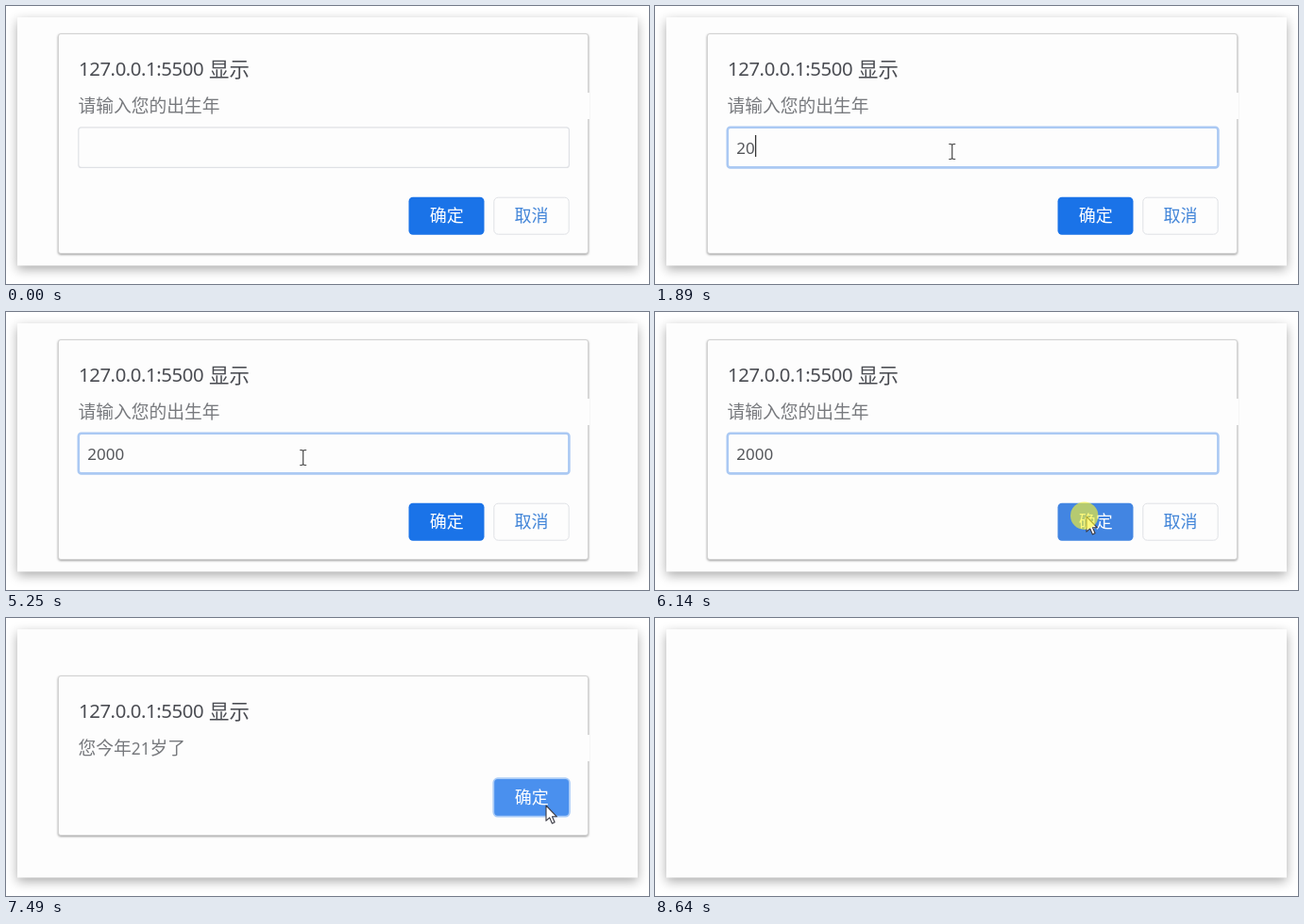
An HTML page that plays this animation: 681 px wide and 295 px high, repeating every 9.05 s.

```html
<!DOCTYPE html>
<html lang="zh">
<head>
<meta charset="utf-8">
<title>Prompt and alert</title>
<style>
  html, body { margin: 0; width: 100%; height: 100%; overflow: hidden; background: #fff; }
  svg { display: block; width: 681px; height: 295px; }
  text { font-family: "Noto Sans CJK SC", "Noto Sans CJK", sans-serif; white-space: pre; }
  .num { font-family: "Noto Sans", "Open Sans", sans-serif; }
  .card { fill: #fdfdfd; filter: drop-shadow(0 4px 6px rgba(0, 0, 0, .33)); }
  .panel { fill: #fdfdfd; stroke: #d2d2d2; filter: drop-shadow(0 1.5px 1.2px rgba(0, 0, 0, .38)); }
  .title { fill: #4a4c52; font-size: 21.4px; }
  .title .num, .title.num { font-size: 20.3px; letter-spacing: -.4px; }
  .body { fill: #77797d; font-size: 18.75px; }
  .body .num { font-size: 17.3px; }
  .value { fill: #55575b; font-size: 17px; }
  .label { font-size: 18px; text-anchor: middle; }
</style>
</head>
<body>
<svg viewBox="0 0 681 295">
  <defs>
    <clipPath id="inside"><rect x="12" y="12" width="657" height="264"/></clipPath>
    <g id="host">
      <text class="title num" x="77" y="74">127.0.0.1:5500</text>
      <text class="title" x="215" y="74.5">显示</text>
    </g>
  </defs>

  <rect class="card" x="12" y="12" width="657" height="263.5"/>

  <g id="prompt">
    <rect class="panel" x="55.5" y="29.5" width="561" height="233" rx="2.5"/>
    <rect x="616" y="92" width="2" height="28" fill="#fdfdfd"/>
    <use href="#host"/>
    <text class="body" x="76.5" y="112.6">请输入您的出生年</text>
    <rect id="field" x="76.8" y="128.8" width="519.6" height="42.6" rx="3" fill="#fdfdfd"/>
    <text id="value" class="value num" x="86.3" y="156.7"></text>
    <rect id="caret" y="137" width="1.3" height="23" fill="#333"/>
    <rect id="ok" x="426.5" y="202.7" width="80" height="40" rx="4.5"/>
    <text class="label" x="466.7" y="228.9" fill="#fff">确定</text>
    <rect x="516.8" y="203.2" width="79.4" height="39" rx="4.5" fill="#fdfdfd" stroke="#dfe1e5"/>
    <text class="label" x="556.5" y="228.9" fill="#4285d8">取消</text>
  </g>

  <g id="alert">
    <rect class="panel" x="55.5" y="61.5" width="561" height="169" rx="2.5"/>
    <rect x="616" y="124" width="2" height="28" fill="#fdfdfd"/>
    <use href="#host" y="32"/>
    <text class="body" x="76.5" y="144.6">您今年<tspan class="num">21</tspan>岁了</text>
    <rect id="done" x="516.3" y="170.2" width="80.6" height="40.4" rx="4.5" stroke="#a9cbf7" stroke-width="1.8"/>
    <text class="label" x="556.7" y="196.9" fill="#fff">确定</text>
  </g>

  <g clip-path="url(#inside)">
    <g id="pointer">
      <path id="arrow" d="M0 0V16.2L3.7 12.8L6.4 19L9.1 17.8L6.5 11.8H11.4Z"
            fill="#fff" stroke="#3a3a44" stroke-width="1.1" stroke-linejoin="round"/>
      <path id="beam" d="M-3.5 -7.5H-1.2L0 -6.6L1.2 -7.5H3.5M0 -6.6V7.6M-3.5 8.5H-1.2L0 7.6L1.2 8.5H3.5"
            fill="none" stroke="#4a4a4a" stroke-width="1.2"/>
      <circle id="halo" cx="-2.3" cy="-.8" r="14.7" fill="#fcf62c" fill-opacity=".62"/>
    </g>
  </g>
</svg>
<script>
const LOOP = 9050, STEP = 68, BLINK = 525;
const $ = id => document.getElementById(id);
const show = (id, on) => $(id).setAttribute('display', on ? 'inline' : 'none');
const set = (id, attrs) => { for (const k in attrs) $(id).setAttribute(k, attrs[k]); };
const within = (t, a, b) => t >= a && t < b;

// time, pointer x, pointer y
const path = [
  [70, 398, 266], [340, 345, 200], [610, 314.7, 154], [5250, 314.7, 154],
  [5610, 352, 168], [6070, 457, 217], [6270, 457, 217], [6690, 593, 183],
  [7100, 570, 196], [7420, 570, 196], [7490, 572, 199], [7690, 572, 199],
  [8230, 573, 208], [8430, 573, 208], [8520, 621, 257], [8590, 617, 253], [8640, 617, 253]
];

// time, field content
const edits = [
  [740, ''], [1750, '2'], [1890, '20'], [2610, '202'], [2740, '2020'],
  [3540, '202'], [3680, '20'], [4340, '200'], [4470, '2000']
];

const clicks = [[670, 870], [6140, 6270], [8300, 8430]];

function pointerAt(t) {
  const i = path.findIndex(p => p[0] > t);
  const [t0, x0, y0] = path[i - 1], [t1, x1, y1] = path[i];
  const n = Math.max(1, Math.round((t1 - t0) / STEP));
  const k = Math.floor((t - t0) / (t1 - t0) * n) / n;
  return [x0 + (x1 - x0) * k, y0 + (y1 - y0) * k];
}

function draw(t) {
  const asking = t < 6270, telling = within(t, 6340, 8430);
  const visible = within(t, 70, 8640);
  const [x, y] = visible ? pointerAt(t) : [0, 0];
  const over = (l, top, r, b) => visible && x >= l && x <= r && y >= top && y <= b;

  show('prompt', asking);
  show('alert', telling);

  const focused = t >= 740;
  set('field', { stroke: focused ? '#abc9f3' : '#dfe1e5', 'stroke-width': focused ? 2.6 : 1.2 });
  const edit = edits.filter(e => e[0] <= t).pop();
  const text = edit ? edit[1] : '';
  $('value').textContent = text;
  $('caret').setAttribute('x', 86.5 + 9.72 * text.length);
  show('caret', edit && (t - edit[0]) % (2 * BLINK) < BLINK);

  set('ok', { fill: over(427, 203, 507, 243) ? '#4285e2' : '#1a73e8' });
  const hot = over(516, 170, 597, 211);
  set('done', { fill: !hot ? '#1a73e8' : t < 7690 ? '#4a90ee' : '#428aeb' });

  show('pointer', visible);
  const typing = asking && over(77, 129, 597, 172);
  show('beam', typing);
  show('arrow', !typing);
  show('halo', clicks.some(([a, b]) => within(t, a, b)));
  set('pointer', { transform: `translate(${x} ${y})` });
}

const start = performance.now();
function tick() {
  draw((performance.now() - start) % LOOP);
  requestAnimationFrame(tick);
}
tick();
</script>
</body>
</html>
```
